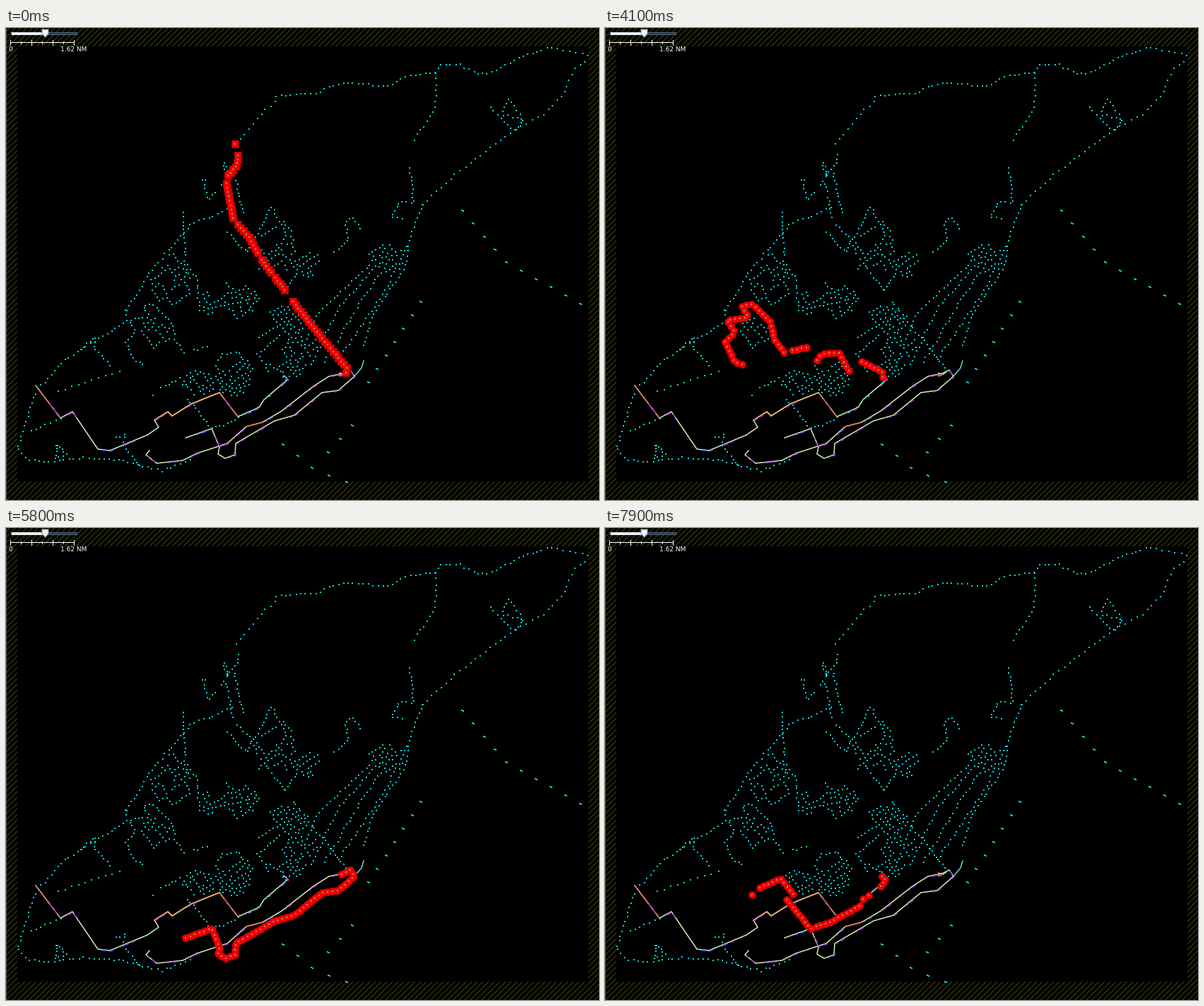
Animation, 839 px wide and 668 px high, one loop 8000 ms. Source, as a matplotlib script:

```python
import numpy as np
import matplotlib.pyplot as plt
from matplotlib.animation import FuncAnimation
from matplotlib.patches import Polygon, Rectangle

W, H, DPI = 839, 668, 64
PT = 72 / DPI
STEP, LOOP = 100, 8000
rng = np.random.default_rng(7)

fig = plt.figure(figsize=(W / DPI, H / DPI), dpi=DPI, facecolor="black")
ax = fig.add_axes([0, 0, 1, 1])
ax.set_xlim(0, W)
ax.set_ylim(H, 0)
ax.axis("off")


# ---- geometry helpers
def walk(path, step):
    """Evenly spaced points along a polyline."""
    p = np.array(path, float)
    if len(p) < 2:
        return p
    d = np.r_[0, np.cumsum(np.hypot(*np.diff(p, axis=0).T))]
    s = np.linspace(0, d[-1], max(1, round(d[-1] / step)) + 1)
    return np.c_[np.interp(s, d, p[:, 0]), np.interp(s, d, p[:, 1])]


def cut(path, a, b):
    """The part of a polyline between two fractions of its length."""
    p = walk(path, 1)
    n = len(p) - 1
    return p[round(a * n):round(b * n) + 1]


def shift(path, dx, dy):
    return np.array(path, float) + (dx, dy)


# ---- drawing helpers
def line(path, color, width, z, **kw):
    return ax.plot(*np.asarray(path).T, color=color, lw=width * PT, zorder=z,
                   solid_joinstyle="round", **kw)[0]


def dots(pts, size, color, z, marker="s", **kw):
    return ax.scatter(*np.asarray(pts).T, s=(size * PT) ** 2, c=color,
                      marker=marker, linewidths=0, zorder=z, **kw)


def rect(x, y, w, h, color, z=5):
    ax.add_patch(Rectangle((x, y), w, h, fc=color, ec="none", zorder=z))


# ---- hatched border, slider and scale bar
for c in range(5, W + H, 8):
    line([(c, 0), (c - H, H)], "#48480a", 1, 0)
rect(16, 26, 808, 616, "black", 1)
rect(0, 0, 1, H, "#4b5866")

rect(7, 6, 94, 4, "#52667e")
rect(8, 6, 46, 4, "#e6eef6")
rect(60, 7, 40, 2, "#26384e")
ax.add_patch(Polygon([(51, 2), (60, 2), (60, 8), (55.5, 13), (51, 8)],
                     fc="#eef2f6", ec="#8b9aaa", lw=PT, zorder=6))
rect(6, 20, 91, 1, "white")
for k in range(7):
    rect(6 + 15 * k, 17 + k % 2 * 2, 1, 8 - k % 2 * 4, "white")
for x, label in ((3, "0"), (77, "1.62 NM")):
    ax.text(x, 33, label, color="white", size=9 * PT, family="DejaVu Sans", zorder=6)

# ---- bus lines, as runs of stops
tip = [(324, 164)]
bend = [(328, 180), (327, 193), (314, 209)]
upper = [(312, 220), (321, 269)]
middle = [[(328, 278), (345, 297), (356, 318)], [(362, 328), (375, 346)], [(381, 353), (394, 371)]]
lower = [(406, 387), (430, 418), (482, 481)]
end = [(481, 488)]
pier = [(510, 502)]
detour = [(314, 288), (340, 318), (364, 275), (376, 253), (397, 292),
          (386, 311), (414, 345), (394, 371)]
hook = [(282, 214), (277, 214), (286, 243), (297, 232)]
spur = [(305, 221), (313, 210), (308, 191), (312, 192), (313, 208)]

hill = [[(194, 476), (183, 472), (170, 445), (183, 430), (173, 414), (202, 409), (194, 393),
         (208, 391), (234, 416), (239, 440), (253, 459)], [(265, 456), (285, 452)]]
head = [[(300, 470), (306, 461), (330, 459), (345, 485)], [(363, 472), (392, 487), (393, 494)]]
centre = [[(208, 519)], [(219, 509), (248, 496), (266, 518)],
          [(257, 526), (291, 567), (320, 557), (360, 535)],
          [(365, 525), (373, 520)], [(392, 493), (397, 498), (390, 507)]]

west = [(42, 506), (77, 552), (94, 543), (130, 596), (147, 598), (200, 576), (216, 565),
        (210, 555), (229, 543), (235, 549), (262, 532), (302, 516), (328, 550), (358, 537),
        (365, 526), (399, 497), (393, 492)]
north = [(482, 488), (457, 493), (435, 507), (390, 542), (363, 558), (340, 564), (313, 588),
         (270, 602), (250, 612), (213, 616), (198, 604), (203, 598)]
south = [(475, 490), (487, 484), (493, 493), (470, 513), (447, 516), (408, 548), (380, 556),
         (325, 588), (324, 604), (310, 609), (300, 603), (302, 593), (291, 567), (254, 580)]

# ---- coast and country roads
sound = [(382, 96), (440, 92), (473, 78), (541, 82), (571, 67), (607, 64), (615, 52),
         (640, 51), (670, 66), (690, 62), (730, 40), (772, 27)]
cape = [(772, 27), (822, 37), (822, 45), (804, 58), (790, 92), (762, 122), (716, 146),
        (637, 206), (590, 250)]
bay = [(590, 250), (570, 300), (567, 335), (520, 405), (505, 450)]
shore = [(170, 400), (172, 415), (82, 470), (42, 515), (17, 595), (28, 610), (60, 614),
         (112, 608), (165, 612), (220, 627), (260, 612)]
ridge = [(319, 255), (262, 278), (208, 340), (170, 400)]
ferry = [[(645, 258), (705, 330), (812, 390)], [(586, 387), (512, 501)],
         [(489, 562), (455, 600)], [(391, 589), (440, 628), (481, 642)]]

stops = []


def road(path, step=6, jitter=1.3):
    p = walk(path, step)
    stops.extend(p + rng.uniform(-jitter, jitter, p.shape))


def town(cx, cy, rx, ry, count):
    """Streets wandering along the two main directions of the town."""
    placed, tries = 0, 0
    pos, heading = np.array([cx, cy], float), -.6
    while placed < count and tries < 40 * count:
        tries += 1
        if rng.random() < .14:
            heading += rng.choice([-1, 1]) * np.pi / 2
        turn = heading + rng.normal(0, .2)
        nxt = pos + 6 * np.array([np.cos(turn), np.sin(turn)])
        if np.hypot((nxt[0] - cx) / rx, (nxt[1] - cy) / ry) > 1:
            heading += np.pi / 2
            continue
        pos = nxt
        if np.hypot(*(np.array(stops) - pos).T).min() > 4.5:
            stops.append(pos)
            placed += 1


for path in (sound, bay, shore, ridge):
    road(path, 7)
road(cape, 9)
for path in ferry:
    pts = walk(path, 24)
    stops.extend(pts)
    stops.extend(shift(pts, 2, 1))
road([(381, 104), (365, 117), (347, 140), (325, 164)], 9)
road([(608, 64), (609, 90), (607, 115), (578, 158)], 8)
road([(685, 113), (718, 146), (732, 133), (712, 100), (700, 122), (730, 130)], 7)
road([(572, 198), (577, 247), (557, 247), (545, 266), (560, 270)])
road([(465, 318), (485, 300), (480, 275), (490, 267), (502, 283)])
road([(250, 262), (254, 318), (252, 345), (270, 350), (274, 400), (345, 385)])
road([(323, 205), (335, 262)])
road([(160, 487), (75, 514)], 10)
road([(35, 570), (77, 553)], 8)
road([(72, 590), (85, 604), (70, 609), (72, 590)], 5)
road([(155, 580), (168, 575), (165, 590), (190, 620)])
road([(106, 455), (127, 437), (125, 455), (147, 477)])
for run in (bend, upper, *middle, lower, detour, hook, spur, *hill, *head, *centre):
    road(run)

# roads fanning out down the east slope
top, left, right = np.array([[(515, 335), (568, 308)], [(440, 405), (412, 480)],
                             [(535, 375), (470, 470)]])
for f in np.linspace(0, 1, 4):
    mid, low = left[0] + f * (right[0] - left[0]), left[1] + f * (right[1] - left[1])
    road([top[0] + f * (top[1] - top[0]), mid, low], 7)

for district in ((235, 355, 32, 38, 50), (378, 310, 32, 45, 36), (425, 330, 18, 24, 22),
                 (315, 385, 45, 28, 48), (395, 445, 48, 52, 100), (322, 490, 28, 32, 50),
                 (270, 502, 26, 18, 26), (540, 328, 28, 22, 26), (208, 432, 30, 22, 26)):
    town(*district)
dots(np.round(stops), 2, "#0cd8da", 4, antialiased=False)

# ---- coloured ways with dashes of other lines beside them
for way in (west, north, south):
    line(way, "#f2ecac", 1.5, 2)
    line(way, "#58e8d8", 1, 3, ls=(0, (3, 7)))
    for a in np.arange(.05, .95, .11) + rng.uniform(-.03, .03, 9)[:len(np.arange(.05, .95, .11))]:
        color = rng.choice(["#9020e0", "#a828d0", "#3050ff"])
        line(shift(cut(way, a, a + .04), 1, 1), color, 1.7, 3.4, ls=(0, (3.5, 2.5)))
line([(506, 471), (503, 481), (493, 493)], "#70ece0", 1.4, 3)
for part, color in ((west[:2], "#f06a50"), (west[11:13], "#f06a50"),
                    (north[4:6], "#f06a50"), (west[7:12], "#f5b060")):
    line(part, color, 1.5, 3.2)
line([(472, 488), (480, 490), (472, 493), (472, 488)], "#d8b060", 1, 3.5)


# ---- highlighted lines
def route(*runs, step=6, marker="s", band=False):
    """Hidden artists of one selected line."""
    pts = np.round(np.vstack([walk(r, step) for r in runs]))
    art = [dots(pts, 11, "#b40000", 7, marker),
           dots(pts, 8.5, "#f20000", 8, marker),
           dots(pts, 2, "#c09078", 10, antialiased=False)]
    if band:
        for r in runs:
            art += [line(r, "#b40000", 9, 7), line(r, "#f20000", 7, 8)]
    for a in art:
        a.set_visible(False)
    return art


wide = dict(step=7, marker="o")
back = [tip] + [shift(r, -1, 2) for r in (bend, upper, lower)]
schedule = {
    0: route(tip, bend, upper, *middle, lower, end),
    1200: route(*back, *[shift(m, -1, 2) for m in middle]),
    1600: route(*back, detour),
    1900: route(tip, bend, upper, detour, lower, [(482, 494)]),
    2300: route(hook, spur, upper, *middle, lower, [(480, 488), (488, 487)], pier),
    4100: route(*hill, *head, **wide),
    4600: route(*head, *centre[:2], cut(shore, .27, .62), **wide),
    4900: route(west[:8], west[8:], band=True, **wide),
    5400: route(pier, cut(lower, .5, 1), cut(west, 0, .42), cut(west, .75, 1), **wide),
    5800: route(south, band=True, **wide),
    6200: route(cut(lower, .3, 1), cut(west, .68, 1)),
    6500: route(cut(middle[0], .75, 1), *middle[1:], shift(lower, 2, 0), end),
    6900: route(north[:3], cut(north, .17, .69), cut(north, .75, 1), band=True),
    7400: route(ferry[-1], cut(shore, .72, 1), cut(west, .68, 1), **wide),
    7900: route(*centre, **wide),
}


def update(frame):
    current = max(t for t in schedule if t <= frame * STEP)
    for t, art in schedule.items():
        for a in art:
            a.set_visible(t == current)
    return []


anim = FuncAnimation(fig, update, frames=LOOP // STEP, interval=STEP,
                     init_func=lambda: update(0), repeat=True, repeat_delay=0)
plt.show()
```
